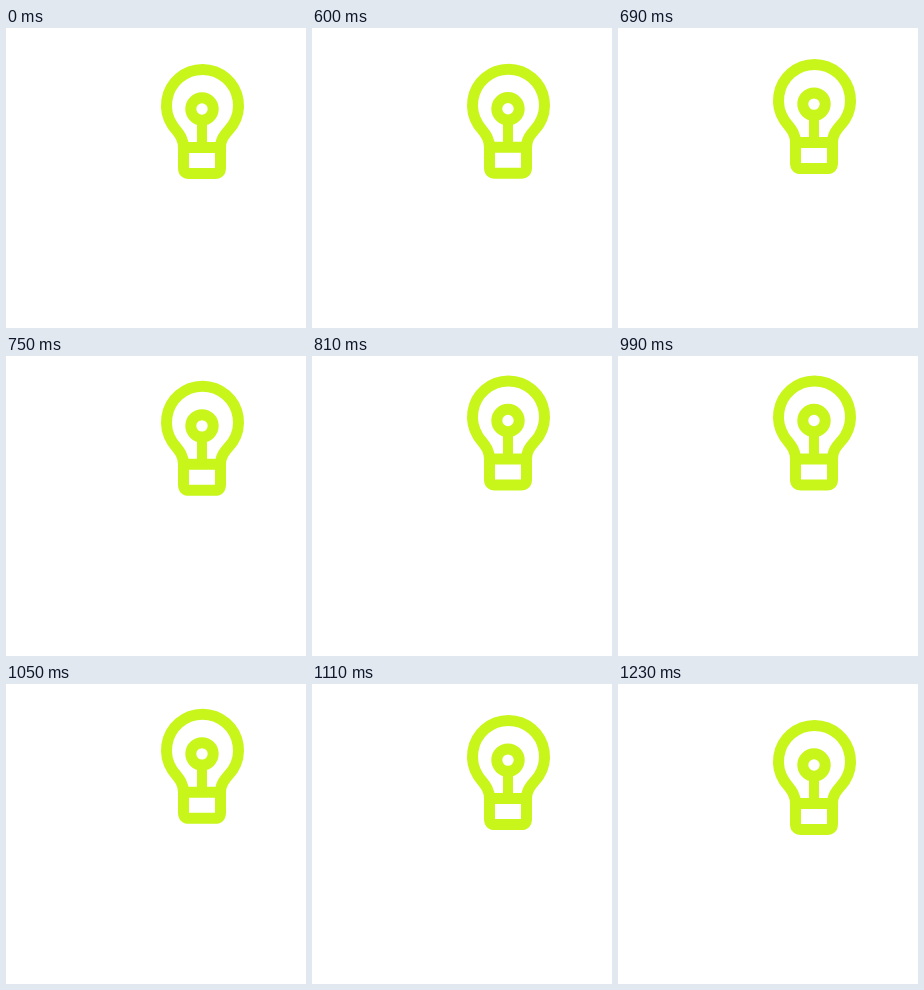
An HTML page for the animation above (1.5 s loop, 300 by 300 pixels).

```html
<!DOCTYPE html>
<html lang="en">
<head>
<meta charset="utf-8">
<title>Bouncing bulb</title>
<style>
  html, body { margin: 0; width: 100%; height: 100%; overflow: hidden; background: #fff; }
  svg { display: block; width: 100%; height: 100%; }
</style>
</head>
<body>
<svg viewBox="0 0 300 300">
  <g id="bulb" fill="none" stroke="#c8f51a" stroke-width="11">
    <!-- glass -->
    <path d="M177.5 119.5C177.5 108 170.2 103.2 166 96.5A36 36 0 1 1 227 96.5C222.8 103.2 214.5 108 214.5 119.5"/>
    <!-- socket -->
    <path d="M177.5 119.5V140Q177.5 145.5 183 145.5H209Q214.5 145.5 214.5 140V119.5Z"/>
    <!-- filament -->
    <circle cx="196" cy="81" r="11.2"/>
    <path d="M196 91V119" stroke-width="10"/>
  </g>
</svg>
<script>
const LOOP = 1500, STEP = 30;
const START = 570, PEAK = 900, END = 1230, RISE = 19;
const bulb = document.getElementById('bulb');

function ease(p) {
  const a = p ** 1.9, b = (1 - p) ** 1.9;
  return a / (a + b);
}

function lift(t) {
  if (t <= START || t >= END) return 0;
  const p = t < PEAK ? (t - START) / (PEAK - START) : (END - t) / (END - PEAK);
  return RISE * ease(p);
}

function draw(ms) {
  const t = Math.floor((ms % LOOP) / STEP) * STEP;
  bulb.setAttribute('transform', `translate(0 ${-lift(t).toFixed(2)})`);
}

function tick() {
  draw(performance.now());
  requestAnimationFrame(tick);
}
tick();
</script>
</body>
</html>
```
